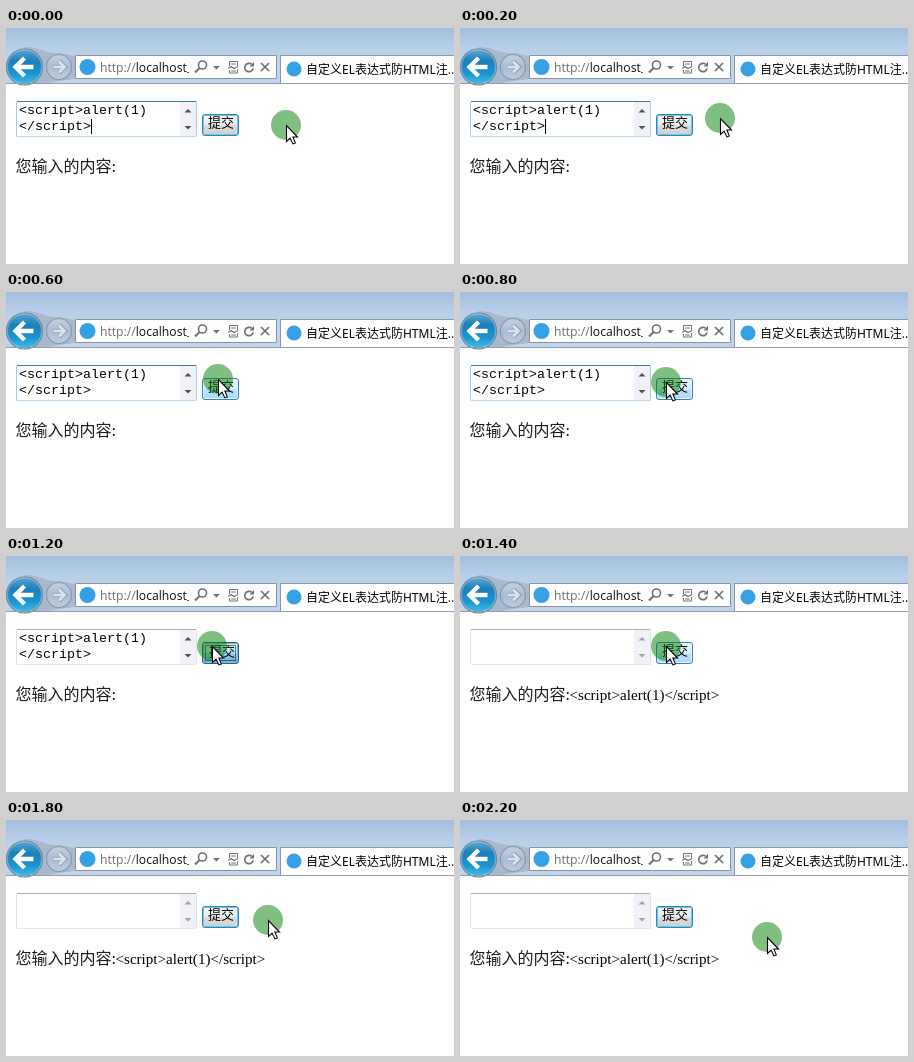
Write an HTML page with a canvas that moves like this. It is 448 px wide and 236 px high and loops after 2.8 s.

```html
<!DOCTYPE html>
<html lang="zh">
<head>
<meta charset="utf-8">
<title>Form demo</title>
<style>
html, body { margin: 0; width: 100%; height: 100%; overflow: hidden; background: #fff; }
canvas { display: block; width: 448px; height: 236px; }
</style>
</head>
<body>
<canvas id="stage" width="448" height="236"></canvas>
<script>
const ctx = document.getElementById('stage').getContext('2d');
const STEP = 200, LOOP = 2800;
const SANS = '"Open Sans", "Noto Sans", sans-serif';
const CJK = '"Noto Sans CJK SC", "Noto Sans CJK", sans-serif';
const SERIF = '"Liberation Serif", serif';
const MONO = '"Liberation Mono", monospace';

// pointer tip at every step
const PATH = [
  [280, 97], [260, 90], [234, 86], [212, 87], [206, 90], [206, 90],
  [206, 90], [206, 90], [218, 92], [262, 100], [305, 116], [307, 117]
];

const BUTTON = {
  normal: ['#3c7fb1', '#f3f3f3', '#ebebeb', '#dddddd', '#cfcfcf', '#5fcdf0'],
  hover: ['#3c7fb1', '#eaf6fd', '#d9f0fc', '#bee6fd', '#a7d9f5', '#e4f5fe'],
  pressed: ['#2c628b', '#d5edf9', '#c4e5f6', '#98d1ef', '#68b3db', '#7fb4d0']
};

function fade(y0, y1, ...stops) {
  const g = ctx.createLinearGradient(0, y0, 0, y1);
  stops.forEach((c, i) => g.addColorStop(i / (stops.length - 1), c));
  return g;
}

function rect(x, y, w, h, fill) {
  ctx.fillStyle = fill;
  ctx.fillRect(x, y, w, h);
}

function frame(x, y, w, h, color, r = 0) {
  ctx.strokeStyle = color;
  ctx.lineWidth = 1;
  ctx.beginPath();
  ctx.roundRect(x + .5, y + .5, w - 1, h - 1, r);
  ctx.stroke();
}

function disc(x, y, r, fill, line, width = 1) {
  ctx.beginPath();
  ctx.arc(x, y, r, 0, Math.PI * 2);
  if (fill) { ctx.fillStyle = fill; ctx.fill(); }
  if (line) { ctx.strokeStyle = line; ctx.lineWidth = width; ctx.stroke(); }
}

function trace(points) {
  ctx.beginPath();
  points.forEach(([x, y]) => ctx.lineTo(x, y));
}

function poly(points, fill) {
  trace(points);
  ctx.closePath();
  ctx.fillStyle = fill;
  ctx.fill();
}

function line(points, color, width) {
  trace(points);
  ctx.strokeStyle = color;
  ctx.lineWidth = width;
  ctx.stroke();
}

function text(str, x, y, font, color = '#000') {
  ctx.font = font;
  ctx.fillStyle = color;
  ctx.fillText(str, x, y);
  return x + ctx.measureText(str).width;
}

function navArrow(x, y, s, dir, color, width) {
  line([[x - dir * s, y], [x + dir * s, y]], color, width);
  line([[x, y - s], [x + dir * s, y], [x, y + s]], color, width);
}

function addressIcons() {
  const ink = '#6c7178';
  disc(196.5, 37, 4, null, ink, 1.6);
  line([[193.5, 40], [189, 44.5]], ink, 2.2);
  poly([[207, 38], [214, 38], [210.5, 41.5]], ink);
  line([[223.5, 38], [223.5, 33.5], [231.5, 33.5], [231.5, 38]], ink, 1);
  line([[225, 36], [230, 36]], ink, 1);
  line([[222, 40.5], [225, 38.5], [228, 40.5], [232, 38.5]], ink, 1.1);
  line([[223.5, 42], [223.5, 45], [231.5, 45], [231.5, 41]], ink, 1);
  line([[225, 43], [230, 43]], ink, 1);
  ctx.beginPath();
  ctx.arc(243, 39.5, 4.2, .2, Math.PI * 1.72);
  ctx.strokeStyle = ink;
  ctx.lineWidth = 1.7;
  ctx.stroke();
  poly([[243.5, 38.5], [248, 38.5], [248, 34]], ink);
  line([[255, 35], [263, 43]], ink, 1.7);
  line([[263, 35], [255, 43]], ink, 1.7);
}

function navButtons() {
  // shaded recess around both buttons
  ctx.beginPath();
  ctx.moveTo(18, 19);
  ctx.bezierCurveTo(36, 19, 38, 26, 53, 25);
  ctx.bezierCurveTo(60, 25, 64, 28, 70, 28);
  ctx.lineTo(70, 51);
  ctx.bezierCurveTo(60, 51, 48, 55, 36, 55);
  ctx.lineTo(18, 55);
  ctx.fillStyle = '#a9b9cb';
  ctx.fill();

  disc(18.5, 39, 18, fade(21, 57, '#5fa9d3', '#1a80bb', '#1c92cc', '#3cc3ea'), '#7388a0', 1.2);
  disc(18.5, 39, 17, null, 'rgba(255,255,255,.35)');
  navArrow(18.5, 39, 9, -1, '#fff', 4.4);
  disc(53, 39, 12.5, fade(26, 52, '#c3d1e1', '#aabdd2', '#bccde0'), '#8599b0', 1.2);
  navArrow(53, 39, 6, 1, '#8fa3ba', 4.4);
  navArrow(53, 39, 5.5, 1, '#dbe5f0', 2.6);
}

function chrome() {
  rect(0, 0, 448, 55, fade(0, 55, '#a3bfde', '#b6cee8', '#c2d6ec', '#bfd3ea'));
  navButtons();
  rect(0, 55, 448, 1, '#949eaa');

  rect(69, 27, 202, 24, '#fff');
  frame(69, 27, 202, 24, '#8593a4');
  disc(81.5, 39, 8, '#35a0e4');
  const font = '12.2px ' + SANS;
  const x = text('http://', 94, 44, font, '#6e6e6e');
  text('localhost', x, 44, font, '#111');
  rect(181, 44, 2, 1, '#555');
  addressIcons();

  rect(274, 27, 174, 28, '#fff');
  rect(274, 27, 174, 1, '#8b98a8');
  rect(274, 27, 1, 28, '#8b98a8');
  disc(288, 41, 7.5, '#35a0e4');
  text('自定义EL表达式防HTML注...', 300, 46, '12px "Noto Sans", ' + CJK);
}

function textarea(focused, filled, caret) {
  const [top, side, bottom] = focused
    ? ['#3d7bad', '#a4c9e3', '#b7d9ed']
    : ['#abadb3', '#dde1ea', '#e3e9ef'];
  frame(10, 73, 181, 36, side, 1);
  rect(11, 73, 179, 1, top);
  rect(11, 108, 179, 1, bottom);
  rect(174, 74, 16, 34, '#f0f2f7');
  const ink = filled ? '#4d535b' : '#a3a3a3';
  poly([[178.5, 84.5], [185.5, 84.5], [182, 81]], ink);
  poly([[178.5, 98], [185.5, 98], [182, 101.5]], ink);
  if (filled) {
    const font = '13.33px ' + MONO;
    text('<script>alert(1)', 13, 86, font);
    text('<\/script>', 13, 102, font);
  }
  if (caret) rect(85, 91, 1, 15, '#000');
}

function button(state) {
  const [edge, a, b, c, d, inner] = BUTTON[state];
  const g = ctx.createLinearGradient(0, 87, 0, 107);
  [[0, a], [.5, b], [.5, c], [1, d]].forEach(s => g.addColorStop(...s));
  rect(197, 87, 35, 20, g);
  frame(197, 87, 35, 20, inner, 1);
  frame(196, 86, 37, 22, edge, 2.5);
  if (state === 'pressed') {
    ctx.setLineDash([1, 1]);
    frame(199, 89, 31, 16, '#000');
    ctx.setLineDash([]);
  }
  const shift = state === 'pressed' ? 1 : 0;
  text('提交', 202 + shift, 99 + shift, '13px ' + CJK);
}

function pointer([x, y], down) {
  disc(x, y, down ? 16 : 15, 'rgba(0,128,0,.5)');
  const arrow = [[0, 0], [0, 16], [3.6, 12.6], [6.4, 18.4], [8.8, 17.4], [6.4, 11.5], [11, 11.5]];
  const tip = arrow.map(([dx, dy]) => [x + .5 + dx, y + .5 + dy]);
  poly(tip, '#fff');
  trace(tip);
  ctx.closePath();
  ctx.strokeStyle = '#000';
  ctx.lineWidth = 1.1;
  ctx.stroke();
}

function draw(t) {
  const step = Math.min(Math.floor((t % LOOP) / STEP), PATH.length - 1);
  const sent = step >= 7;
  const pressed = step === 5 || step === 6;
  const hover = step >= 3 && step <= 8;

  rect(0, 0, 448, 236, '#fff');
  chrome();
  textarea(step < 5, !sent, step < 2);
  button(pressed ? 'pressed' : hover ? 'hover' : 'normal');
  text('您输入的内容', 9.5, 144, '300 16px ' + CJK, '#1c1c1c');
  text(':', 105.5, 144, '16px ' + SERIF);
  if (sent) text('<script>alert(1)<\/script>', 109.5, 144, '15.1px ' + SERIF);
  pointer(PATH[step], step === 5);
}

const start = performance.now();
function tick() {
  draw(performance.now() - start);
  requestAnimationFrame(tick);
}
tick();
</script>
</body>
</html>
```
